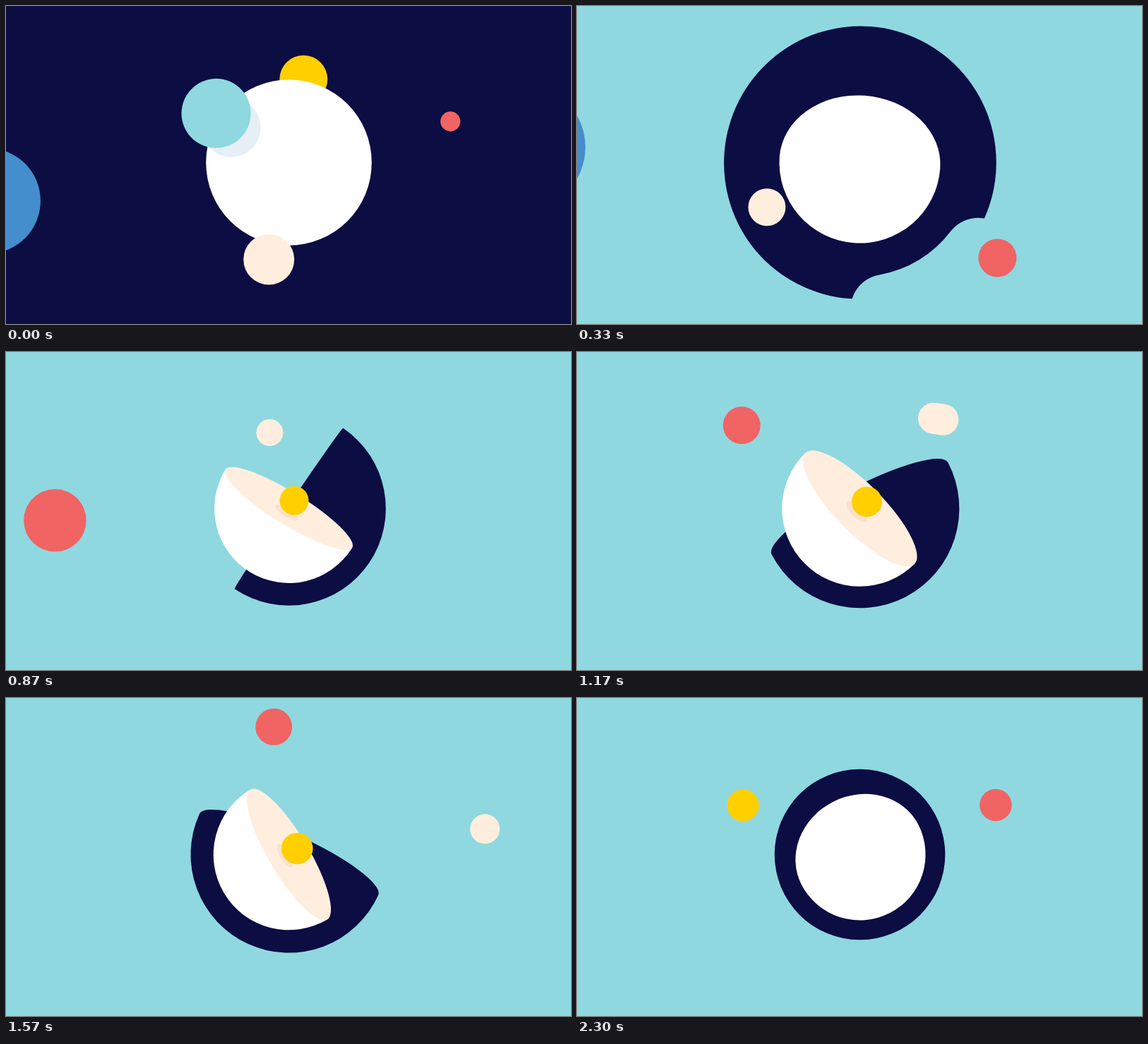
Recreate the animation shown at these times as an HTML page with a canvas. Size 800 by 450 pixels, loop 2330 ms.

```html
<!DOCTYPE html>
<html lang="en">
<head>
<meta charset="utf-8">
<title>Bowls and balls</title>
<style>
  html, body { margin: 0; width: 100%; height: 100%; overflow: hidden; background: #8fd8e0; }
  canvas { display: block; width: 100vw; height: 100vh; }
</style>
</head>
<body>
<canvas id="stage" width="800" height="450"></canvas>
<script>
const ctx = document.getElementById('stage').getContext('2d');
const LOOP = 2330, CX = 400.5, CY = 221.5, TAU = Math.PI * 2;
const SMEAR = 28;

const NAVY = '#0c0d42', TEAL = '#8fd8e0', WHITE = '#ffffff', BLUE = '#448ecd',
      YELLOW = '#ffcf00', RED = '#f06464', CREAM = '#ffeede',
      RIM_SHADE = '#f9e2cb', BALL_SHADE = '#e6eff6';

const rad = deg => deg * Math.PI / 180;
const part = (t, from, to) => Math.min(1, Math.max(0, (t - from) / (to - from)));
const ease = u => u * u * (3 - 2 * u);
const hump = u => Math.sin(Math.PI * u);
const polar = (deg, dist) => [CX + dist * Math.cos(rad(deg)), CY + dist * Math.sin(rad(deg))];

// Orbits around the centre: time, angle, distance, radius
const red = {
  color: RED, smears: [570, 1930],
  keys: [
    [0, -14.4, 236, 14], [330, 34.5, 237, 27], [570, 115.3, 207, 38.5], [780, 163, 350, 47],
    [1170, 215, 204.6, 26.5], [1570, 263.2, 182, 26], [1850, 278, 50, 24],
    [1930, 291, 113, 24], [2050, 306, 185, 23], [2300, 340, 204.7, 22.7]
  ]
};
const cream = {
  color: CREAM, smears: [1170, 1930],
  keys: [
    [0, 101.5, 140, 36], [330, 154.2, 146, 26.5], [570, 187.7, 146, 21], [900, 262, 110, 19],
    [1170, 313, 172, 22], [1570, 352.5, 280, 21], [1930, 380, 27, 20], [2000, 384, 0, 18]
  ]
};
const yellow = {
  color: YELLOW, smears: [],
  keys: [
    [0, -80, 120, 34], [330, -80, 10, 24], [570, -69, 13, 20],
    [1570, -36, 14.5, 22.3], [1930, -89, 32.5, 20], [2300, -157.2, 179.5, 22.7]
  ]
};

// Smooth interpolation that never overshoots its keys
function sample(keys, t) {
  const last = keys.length - 1;
  if (t <= keys[0][0]) return keys[0].slice(1);
  if (t >= keys[last][0]) return keys[last].slice(1);
  let i = 0;
  while (t >= keys[i + 1][0]) i++;
  const a = keys[i], b = keys[i + 1], span = b[0] - a[0], u = (t - a[0]) / span;
  const slope = (n, c) => (keys[n + 1][c] - keys[n][c]) / (keys[n + 1][0] - keys[n][0]);
  const tangent = (n, c) => {
    if (n === 0) return slope(0, c);
    if (n === last) return slope(last - 1, c);
    const p = slope(n - 1, c), q = slope(n, c);
    return p * q <= 0 ? 0 : 2 * p * q / (p + q);
  };
  return a.slice(1).map((v, k) => {
    const c = k + 1, w = ease(u);
    return v * (1 - w) + b[c] * w
      + span * u * (1 - u) * (tangent(i, c) * (1 - u) - tangent(i + 1, c) * u);
  });
}

function place({ keys }, t) {
  const [deg, dist, r] = sample(keys, t);
  return [...polar(deg, dist), r];
}

function disc(x, y, r, color) {
  ctx.fillStyle = color;
  ctx.beginPath();
  ctx.arc(x, y, r, 0, TAU);
  ctx.fill();
}

// A ball stretches back along its own path near its smear times
function ball(track, t) {
  const [x, y, r] = place(track, t);
  disc(x, y, r, track.color);
  for (const time of track.smears) {
    const weight = 1 - Math.abs(t - time) / 90;
    if (weight <= 0) continue;
    const [tx, ty] = place(track, t - SMEAR * weight);
    ctx.strokeStyle = track.color;
    ctx.lineWidth = 2 * r;
    ctx.lineCap = 'round';
    ctx.beginPath();
    ctx.moveTo(x, y);
    ctx.lineTo(tx, ty);
    ctx.stroke();
  }
}

// Bowl poses: an opening move, a swing, and a turn back to front.
// Negative open shows the outside.
function poses(t) {
  const q = part(t, 0, 570), p = part(t, 570, 1930), e = ease(part(t, 1930, 2300));
  const q3 = q ** 3.4;
  return {
    white: {
      r: 117.3 - 20.8 * q3 + 14 * hump(p) - 3.5 * e,
      dir: -90 + 26 * q3 + 5 * p + 30 * hump(p ** 2) - 58 * e,
      open: -1 + 1.06 * q3 + 0.05 * p + 0.23 * hump(p) - 1.01 * e
    },
    navy: {
      r: 134.5 + 485 * (1 - q) ** 2.43 - 8.5 * p ** 2 + 10 * hump(p ** 1.5) - 5.2 * e,
      dir: -153 + 4 * p + 85 * hump(p ** 2.5) - 31 * e,
      open: -1 + 1.195 * part(t, 330, 570) - 0.41 * ease(part(p, 0, 0.43)) - 0.785 * e
    }
  };
}

function bowl({ r, dir, open }, color, inside, shadeOf) {
  const turn = rad(dir + 90), b = r * Math.abs(open);
  ctx.save();
  ctx.translate(CX, CY);
  ctx.rotate(turn);
  ctx.fillStyle = color;
  ctx.beginPath();
  ctx.arc(0, 0, r, 0, Math.PI);
  if (open < 0) ctx.ellipse(0, 0, r, b, 0, Math.PI, TAU);
  ctx.fill();
  if (open > 0) {
    ctx.fillStyle = inside;
    ctx.beginPath();
    ctx.ellipse(0, 0, r, b, 0, 0, TAU);
    ctx.fill();
    if (shadeOf) {
      const [x, y] = shadeOf;
      ctx.clip();
      ctx.rotate(-turn);
      ctx.fillStyle = RIM_SHADE;
      ctx.beginPath();
      ctx.ellipse(x - CX - 20 * Math.cos(rad(dir)), y - CY - 20 * Math.sin(rad(dir)),
        19, 26 * open, turn, 0, TAU);
      ctx.fill();
    }
  }
  ctx.restore();
}

// Teal ball speeding up around the centre, stretched along its orbit
function orbiter(t, whiteR) {
  const angle = time => -145.9 + 224.7 * (time / 330) ** 2;
  const orbit = 124 + 86 * t / 330, head = angle(t), tail = angle(Math.max(0, t - 33));
  const [x, y] = polar(head, orbit);
  ctx.save();
  ctx.beginPath();
  ctx.arc(CX, CY, whiteR, 0, TAU);
  ctx.clip();
  disc(x + 21, y + 20, 42, BALL_SHADE);
  ctx.restore();
  ctx.strokeStyle = TEAL;
  ctx.lineWidth = 98;
  ctx.lineCap = 'round';
  ctx.beginPath();
  ctx.arc(CX, CY, orbit, rad(tail - 0.1), rad(head));
  ctx.stroke();
}

function draw(t) {
  const { white, navy } = poses(t);
  const opened = white.open > 0, intro = t < 450;
  const creamBack = t > 575 && t < 1100;
  const creamInside = t > 1930 && !opened;

  ctx.fillStyle = TEAL;
  ctx.fillRect(0, 0, 800, 450);
  if (creamBack) ball(cream, t);
  bowl(navy, NAVY, BLUE);
  if (intro) {
    const k = t / 330;
    disc(-25.5 - 52.5 * k, 276 - 76 * k, 74.5 + 15.5 * k, BLUE);
  } else {
    ball(red, t);
  }
  if (!opened) ball(yellow, t);
  if (creamInside) ball(cream, t);
  bowl(white, WHITE, CREAM, place(yellow, t));
  if (opened) ball(yellow, t);
  if (intro) {
    orbiter(t, white.r);
    ball(red, t);
  }
  if (!creamBack && !creamInside) ball(cream, t);
}

const start = performance.now();
function tick() {
  draw((performance.now() - start) % LOOP);
  requestAnimationFrame(tick);
}
tick();
</script>
</body>
</html>
```
